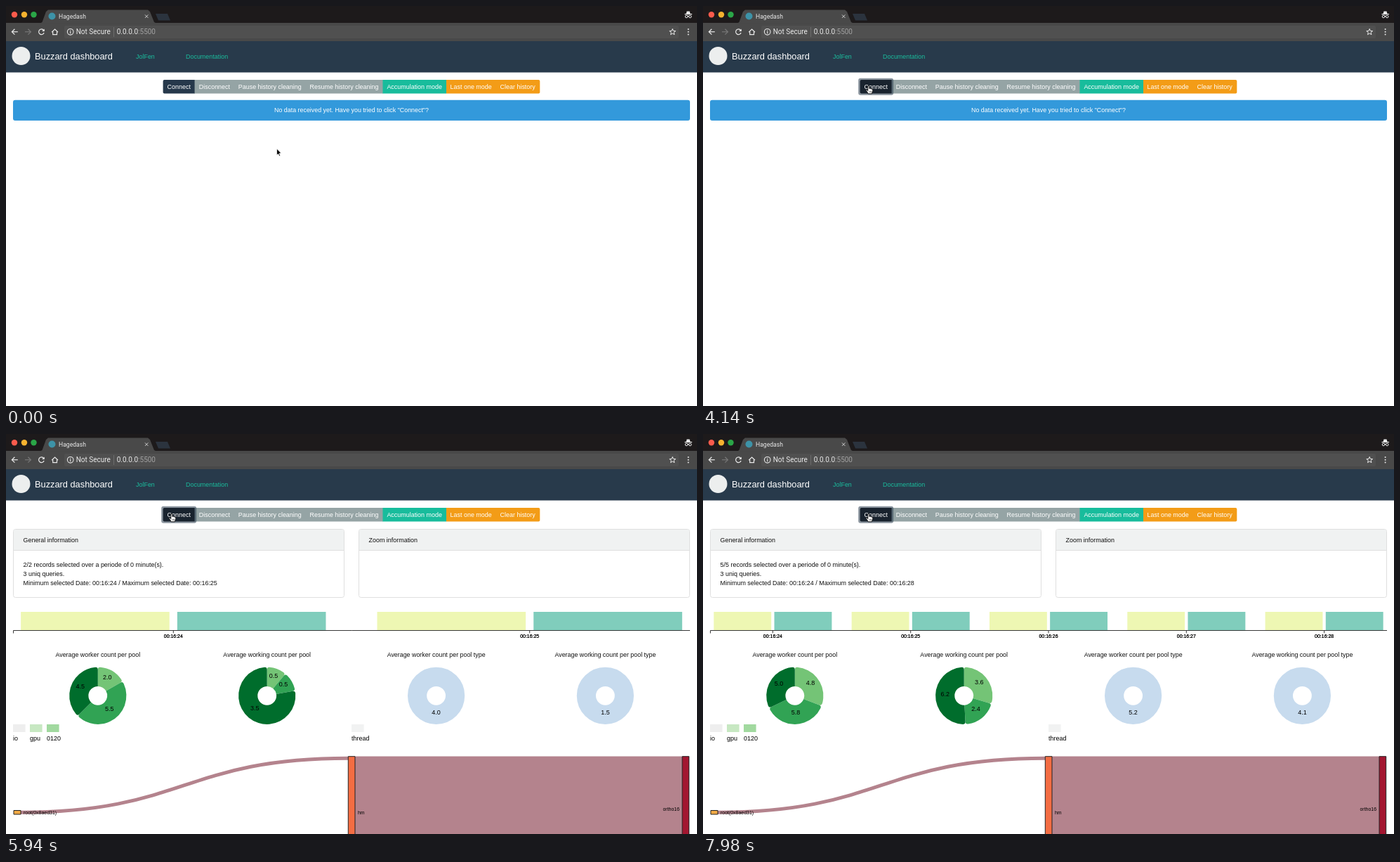
Animation, 984 px wide and 569 px high, one loop 8000 ms. Source, as an HTML page with a canvas:

```html
<!DOCTYPE html>
<html lang="en">
<head>
<meta charset="utf-8">
<title>Dashboard</title>
<style>
html, body { margin: 0; width: 100%; height: 100%; overflow: hidden; background: #fff; }
canvas { display: block; width: 984px; height: 569px; }
</style>
</head>
<body>
<canvas id="stage"></canvas>
<script>
const W = 984, H = 569, LOOP = 8000, STEP = 60;
const SANS = '"Liberation Sans", Arial, sans-serif';
const UI = 'Roboto, "Liberation Sans", sans-serif';
const canvas = document.getElementById('stage');
const ctx = canvas.getContext('2d');
const ratio = window.devicePixelRatio || 1;
canvas.width = W * ratio;
canvas.height = H * ratio;

// Arrival time and running totals of each record
const records = [
  { at: 4260, workers: [1, 7, 5], working: [1, 1, 1] },
  { at: 5160, workers: [4, 11, 9], working: [1, 1, 7] },
  { at: 6100, workers: [10, 16, 17], working: [8, 5, 8] },
  { at: 7020, workers: [17, 22, 21], working: [13, 8, 19] },
  { at: 7920, workers: [24, 29, 25], working: [18, 12, 31] }
];
const GREENS = ['#74c476', '#31a354', '#006d2c'];

function box(x, y, w, h, fill, r = 0, stroke) {
  ctx.beginPath();
  ctx.roundRect(x, y, w, h, r);
  if (fill) { ctx.fillStyle = fill; ctx.fill(); }
  if (stroke) { ctx.strokeStyle = stroke; ctx.lineWidth = 1; ctx.stroke(); }
}

function poly(points, fill, stroke, width = 1, close = true) {
  ctx.beginPath();
  points.forEach(([x, y], i) => i ? ctx.lineTo(x, y) : ctx.moveTo(x, y));
  if (close) ctx.closePath();
  if (fill) { ctx.fillStyle = fill; ctx.fill(); }
  if (stroke) { ctx.strokeStyle = stroke; ctx.lineWidth = width; ctx.stroke(); }
}

function line(points, color, width = 1) {
  poly(points, null, color, width, false);
}

function dot(x, y, r, fill, stroke, width = 1) {
  ctx.beginPath();
  ctx.arc(x, y, r, 0, Math.PI * 2);
  if (fill) { ctx.fillStyle = fill; ctx.fill(); }
  if (stroke) { ctx.strokeStyle = stroke; ctx.lineWidth = width; ctx.stroke(); }
}

// y is the middle of the capitals
function text(str, x, y, size = 8.95, color = '#111', align = 'left', font = SANS) {
  ctx.font = `${size}px ${font}`;
  ctx.textAlign = align;
  ctx.fillStyle = color;
  ctx.fillText(str, x, y + size * 0.35);
}

function drawBrowser() {
  const ink = '#e9e9e9';
  box(0, 0, W, 24, '#1d1a1b');
  box(0, 24, W, 26, '#494949');
  poly([[49, 24.5], [51.5, 23], [57, 8], [60, 5.5], [202, 5.5], [205, 8], [211, 23], [214, 24.5]], '#494949');
  poly([[213, 11], [230, 11], [234, 20.5], [217, 20.5]], '#2b333e');
  [['#fb5b4c', 12], ['#f6b22f', 26], ['#2aa647', 39.5]].forEach(([c, x]) => dot(x, 12.3, 4.2, c));
  dot(65.5, 14.5, 5, '#3d93a8');
  text('Hagedash', 75, 14.7, 8.6, ink, 'left', UI);
  line([[198, 12.5], [202.4, 16.9]], '#d0d0d0');
  line([[202.4, 12.5], [198, 16.9]], '#d0d0d0');

  // Hat and glasses
  poly([[968.5, 11], [969.5, 7.5], [973.5, 7.5], [974.5, 11]], ink);
  box(966.5, 11, 10.5, 1.2, ink);
  dot(969, 15, 1.8, null, ink);
  dot(974.2, 15, 1.8, null, ink);
  line([[970.8, 14.6], [972.4, 14.6]], ink);

  box(83, 28, 875, 18, '#505050', 2);
  line([[16.8, 36.7], [8.5, 36.7]], ink, 1.2);
  line([[12.4, 32.8], [8.4, 36.7], [12.4, 40.6]], ink, 1.2);
  line([[27, 36.7], [35.3, 36.7]], '#777', 1.2);
  line([[31.4, 32.8], [35.4, 36.7], [31.4, 40.6]], '#777', 1.2);

  ctx.beginPath();
  ctx.arc(50.5, 36.7, 3.8, 0.35, Math.PI * 1.78);
  ctx.strokeStyle = ink;
  ctx.lineWidth = 1.3;
  ctx.stroke();
  poly([[54.8, 32.4], [54.8, 36], [51.2, 36]], ink);

  line([[65.2, 37.2], [69.6, 33], [74, 37.2]], ink, 1.2);
  line([[66.7, 36.4], [66.7, 40.7], [72.5, 40.7], [72.5, 36.4]], ink, 1.2);

  dot(91.7, 36.8, 4.3, null, ink, 1.1);
  box(91.2, 36.1, 1.1, 3.1, ink);
  box(91.2, 34.3, 1.1, 1.1, ink);
  text('Not Secure', 99.7, 36.9, 10, ink, 'left', UI);
  line([[153.5, 30], [153.5, 44]], '#6d6d6d');
  text('0.0.0.0', 157.7, 36.9, 10, ink, 'left', UI);
  const hostWidth = ctx.measureText('0.0.0.0').width;
  text(':5500', 157.7 + hostWidth, 36.9, 10, '#a2a2a2', 'left', UI);

  const star = [];
  for (let i = 0; i < 10; i++) {
    const a = i * Math.PI / 5, r = i % 2 ? 2 : 4.6;
    star.push([949.2 + r * Math.sin(a), 37 - r * Math.cos(a)]);
  }
  poly(star, null, ink, 1);
  [33, 36.8, 40.6].forEach(y => dot(971.6, y, 1, ink));
}

function drawNavbar() {
  box(0, 50, W, 44.5, '#283a4b');
  dot(21.5, 71, 13, '#eceeee');
  text('Buzzard dashboard', 41, 71.3, 12.8, '#fff');
  text('JolFen', 185, 72.3, 8.95, '#1abc9c');
  text('Documentation', 256, 72.3, 8.95, '#1abc9c');
}

function drawButtons(t) {
  const hover = Math.min(1, Math.max(0, (t - 420) / 150));
  const mix = (a, b) => Math.round(a + (b - a) * hover);
  box(268, 105, 269, 19.5, '#95a4a5');
  box(536.5, 105, 90.5, 19.5, '#18bc9c');
  box(627, 105, 133.3, 19.5, '#f39c17', [0, 2, 2, 0]);
  if (t >= 1320) box(221.2, 102.8, 50, 24, 'rgba(44,62,80,.55)', 3);
  box(223.6, 105, 45, 19.5, `rgb(${mix(38, 25)},${mix(56, 35)},${mix(75, 46)})`, [2, 0, 0, 2]);
  [['Connect', 229.6], ['Disconnect', 274.8], ['Pause history cleaning', 330.8],
   ['Resume history cleaning', 432.6], ['Accumulation mode', 542.4],
   ['Last one mode', 632.6], ['Clear history', 703.6]
  ].forEach(([label, x]) => text(label, x, 115, 8.95, '#fff'));
}

function drawCard(x, title) {
  box(x + 0.5, 135.5, 471, 97, '#fff', 3, '#dfdfdf');
  box(x + 1, 136, 470, 29.5, '#f0f2f2', [2.5, 2.5, 0, 0]);
  line([[x, 165.5], [x + 472, 165.5]], '#dfdfdf');
  text(title, x + 14.5, 150.5);
}

function drawTimeline(n) {
  const span = n - 0.1;
  const step = n > 1 ? Math.floor(1714 / span) * 0.5625 : 964;
  const left = 10 + (964 - step * span) / 2;
  const band = step * 0.9, sub = band / 2.05;
  line([[10.5, 283.5], [10.5, 279.5], [974, 279.5]], '#222', 0.9);
  for (let i = 0; i < n; i++) {
    const x = left + i * step, mid = x + band / 2;
    box(x + sub * 0.05, 253, sub * 0.95, 26, '#eef7b3');
    box(x + sub * 1.05, 253, sub * 0.95, 26, '#80cdbc');
    line([[mid, 279.5], [mid, 283.3]], '#222', 0.9);
    for (let k = 0; k < 2; k++) text('00:16:' + (24 + i), mid, 288, 6.95, '#000', 'center');
  }
}

function slice(cx, cy, a0, a1, color) {
  const R = 40.6, r = 13.4, c = Math.min(3.5, (a1 - a0) * 10), q = Math.PI / 2;
  const at = (rad, a) => [cx + rad * Math.sin(a), cy - rad * Math.cos(a)];
  ctx.beginPath();
  ctx.moveTo(...at(r, a0));
  ctx.lineTo(...at(R - c, a0));
  ctx.quadraticCurveTo(...at(R, a0), ...at(R, a0 + c / R));
  ctx.arc(cx, cy, R, a0 + c / R - q, a1 - c / R - q);
  ctx.quadraticCurveTo(...at(R, a1), ...at(R - c, a1));
  ctx.lineTo(...at(r, a1));
  ctx.arc(cx, cy, r, a1 - q, a0 - q, true);
  ctx.fillStyle = color;
  ctx.fill();
}

function drawDonut(cx, title, values, colors) {
  const cy = 372.3, total = values.reduce((a, b) => a + b);
  text(title, cx, 314.3, 8.9, '#111', 'center');
  const labels = [];
  let a = 0;
  values.forEach((v, i) => {
    const end = a + v / total * Math.PI * 2, mid = (a + end) / 2;
    if (values.length > 1) slice(cx, cy, a, end, colors[i]);
    else dot(cx, cy, 27, null, colors[i], 27.2);
    labels.push([v.toFixed(1), cx + 27 * Math.sin(mid), cy - 27 * Math.cos(mid) - 3.1]);
    a = end;
  });
  labels.forEach(([s, x, y]) => text(s, x, y, 9, '#000', 'center'));
}

function drawLegend() {
  [['io', 10, '#eeeeee'], ['gpu', 34, '#c7e8c2'], ['0120', 58, '#a1d99f'], ['thread', 492, '#f1f2f2']]
    .forEach(([name, x, color]) => {
      box(x, 413, 17.6, 11, color);
      text(name, x, 433.3, 9, '#000');
    });
}

function drawSankey() {
  const rose = '#b4838d';
  ctx.beginPath();
  ctx.moveTo(21, 538.2);
  ctx.bezierCurveTo(254, 538.2, 254, 461.2, 487, 461.2);
  ctx.strokeStyle = rose;
  ctx.lineWidth = 5;
  ctx.stroke();
  box(497, 458.5, 466, 120, rose);
  box(11, 535.5, 10, 5.5, '#f3ab46', 0, '#222');
  box(487.3, 458.7, 9.7, 120, '#f46d43', 0, '#222');
  box(963, 458.7, 9.7, 120, '#a21630', 0, '#222');
  text('root(0x8aed31)', 25, 538.5, 6.95, '#000');
  text('hm', 501, 538.5, 6.95, '#000');
  text('ortho16', 959, 533.3, 6.95, '#000', 'right');
}

function drawReport(n) {
  const rec = records[n - 1];
  const workers = rec.workers.map(v => v / n), working = rec.working.map(v => v / n);
  const mean = list => [list.reduce((a, b) => a + b) / list.length];
  drawCard(10, 'General information');
  drawCard(502, 'Zoom information');
  text(`${n}/${n} records selected over a periode of 0 minute(s).`, 24.6, 186);
  text('3 uniq queries.', 24.6, 199);
  text(`Minimum selected Date: 00:16:24 / Maximum selected Date: 00:16:${23 + n}`, 24.6, 212);
  drawTimeline(n);
  drawDonut(130.8, 'Average worker count per pool', workers, GREENS);
  drawDonut(371.7, 'Average working count per pool', working, GREENS);
  drawDonut(612.6, 'Average worker count per pool type', mean(workers), ['#c7dbee']);
  drawDonut(853.4, 'Average working count per pool type', mean(working), ['#c7dbee']);
  drawLegend();
  drawSankey();
}

function drawArrow(x, y) {
  poly([[0, 0], [0, 9.3], [2.1, 7.4], [3.5, 10.6], [5, 10], [3.6, 6.8], [6.4, 6.6]]
    .map(([a, b]) => [x + a, y + b]), '#000', '#fff', 0.8);
}

function drawHand(x, y) {
  poly([[-1, 0.4], [0, 0], [1, 0.6], [1, 4], [2.2, 3.6], [3, 4.4], [4.2, 4.2], [4.9, 5], [5.8, 5.2],
    [6, 7], [5.2, 9.4], [4.6, 11.4], [-0.6, 11.4], [-2, 8.8], [-4, 6.4], [-3.2, 5.6], [-1, 7.2]]
    .map(([a, b]) => [x + a, y + b]), '#fff', '#111', 0.9);
  [1.2, 2.8, 4.2].forEach(d => line([[x + d - 0.2, y + 7.4], [x + d - 0.2, y + 9.6]], '#333', 0.6));
}

function drawPointer(t) {
  const k = Math.min(1, t / 540), e = k * k * (3 - 2 * k);
  const nudge = Math.min(1, Math.max(0, (t - 720) / 180));
  const x = 385.6 + (237.2 - 385.6) * e - 1.4 * nudge;
  const y = 203 + (116 - 203) * e - 2.6 * nudge;
  const over = x > 223 && x < 760 && y < 125;
  (over ? drawHand : drawArrow)(x, y);
}

function draw(time) {
  const t = Math.floor(time / STEP) * STEP;
  const n = records.filter(r => t >= r.at).length;
  ctx.setTransform(ratio, 0, 0, ratio, 0, 0);
  ctx.fillStyle = '#fff';
  ctx.fillRect(0, 0, W, H);
  drawBrowser();
  drawNavbar();
  drawButtons(t);
  if (n) drawReport(n);
  else {
    box(10, 133.7, 964, 29.3, '#3399db', 3);
    text('No data received yet. Have you tried to click "Connect"?', 492, 148.3, 8.9, '#fff', 'center');
  }
  drawPointer(t);
}

const start = performance.now();
function tick() {
  draw((performance.now() - start) % LOOP);
  requestAnimationFrame(tick);
}
draw(0);
requestAnimationFrame(tick);
</script>
</body>
</html>
```
